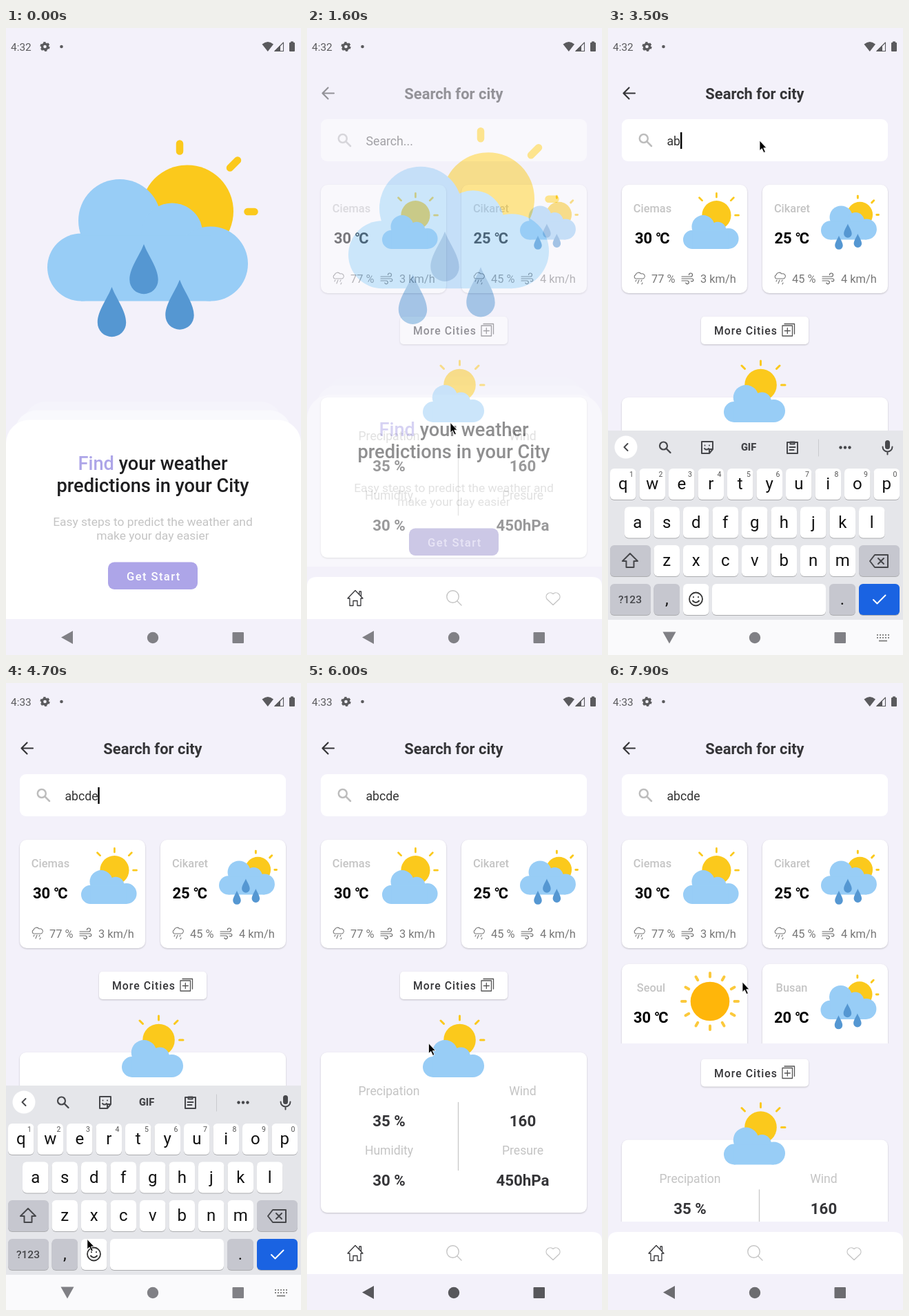
An HTML page that plays this animation: 428x908 px, repeating every 8000 ms.

```html
<!DOCTYPE html>
<html lang="en">
<head>
<meta charset="utf-8">
<title>Weather app</title>
<style>
  html, body { margin: 0; height: 100%; overflow: hidden; background: #f3f1fa; }
  svg { display: block; width: 100vw; height: 100vh; font-family: Roboto, "Noto Sans CJK JP", sans-serif; }
  .card { fill: #fff; filter: drop-shadow(0 1px 1px rgba(0,0,0,.2)); }
  .key { filter: drop-shadow(0 1px 0 rgba(0,0,0,.25)); }
  .line { fill: none; stroke-linecap: round; stroke-linejoin: round; }
</style>
</head>
<body>
<svg id="stage" viewBox="0 0 428 908"></svg>
<script>
const BG = '#f3f1fa', DARK = '#353538', PALE = '#c4c4c4', SUN = '#fbc91c', CLOUD = '#98cdf6';

const text = (x, y, s, size, fill, more = '') =>
  `<text x="${x}" y="${y}" font-size="${size}" fill="${fill}" ${more}>${s}</text>`;
const MID = 'text-anchor="middle"', MEDIUM = 'font-weight="500"', BOLD = 'font-weight="700"';
const rect = (x, y, w, h, r, fill, more = '') =>
  `<rect x="${x}" y="${y}" width="${w}" height="${h}" rx="${r}" fill="${fill}" ${more}/>`;
const circle = (x, y, r, fill, more = '') => `<circle cx="${x}" cy="${y}" r="${r}" fill="${fill}" ${more}/>`;
const line = (d, stroke, width, more = '') =>
  `<path class="line" d="${d}" stroke="${stroke}" stroke-width="${width}" ${more}/>`;
const at = (x, y, s, body) => `<g transform="translate(${x} ${y}) scale(${s})">${body}</g>`;

// Weather pictures; the cloud's origin is its lower left corner
const cloud = `<g fill="${CLOUD}"><circle cx="49" cy="-49" r="49"/><circle cx="105" cy="-116.5" r="60"/>
  <circle cx="181" cy="-97.5" r="44.5"/><circle cx="237" cy="-54" r="54"/><rect x="49" y="-95" width="188" height="95"/></g>`;
const drop = (x, y) => `<path transform="translate(${x} ${y})" fill="#5597d2"
  d="M0-51.5C6-35 20.7-17 20.7 0A20.7 20.7 0 0 1-20.7 0C-20.7-17-6-35 0-51.5z"/>`;
const rainy = circle(203, -130, 67, SUN) +
  line('M192-228v11M265-193l11-11M290.5-129.5h10', SUN, 10.5) +
  cloud + drop(140, -31) + drop(93.5, 31) + drop(192, 20.5);
const cloudy = circle(53.5, -54, 23.3, SUN) +
  line('M53.5-89v6M26-82l4.5 4.5M81-82l-4.5 4.5M83.5-54h5.5', SUN, 3) + at(0, 0, .306, cloud);
const sunny = circle(0, 0, 28.3, '#ffb60a') +
  Array.from({length: 12}, (_, i) => line('M0-35.5v-5.5', '#fbc93c', 4, `transform="rotate(${i * 30})"`)).join('');

const rainIcon = line('M3 9a3 3 0 0 1 0-5.500A4.500 4.500 0 0 1 11 2A3.600 3.600 0 0 1 14 9M4 9h10M4 11l-1 2M8 11l-2 5M12 11l-1 2M13 15l-1 2', '#777', 1.1);
const windIcon = line('M0 5h13a2.500 2.500 0 1 0-2.500-2.500M0 8h15a2 2 0 1 1-1.500 3.500M0 11h8a2.300 2.300 0 1 1-2.200 3', '#666', 1.2);

function cityCard(x, y, city, degrees, shift, humidity, wind, picture) {
  return `<rect class="card" x="${x}" y="${y}" width="182" height="157" rx="10"/>` +
    text(x + 44.5 + shift, y + 40, city, 16.4, PALE, MID + MEDIUM) +
    text(x + 19 + shift, y + 85, degrees + ' ℃', 22, '#000', BOLD) +
    at(x + 17, y + 127, 1, rainIcon) + text(x + 43, y + 142, humidity + ' %', 16.4, '#777') +
    at(x + 87, y + 128, 1, windIcon) + text(x + 114, y + 142, wind + ' km/h', 16.4, '#777') + picture;
}
const stat = (x, y, label, value) =>
  text(x, y, label, 17.6, PALE, MID) + text(x, y + 45, value, 22.3, DARK, MID + BOLD);

const welcome = `<g id="picture">${at(60, 395.5, 1, rainy)}</g>
  <g id="sheet">${rect(26, 541, 375, 200, 32, '#f5f4fb')}${rect(13, 553.5, 401, 200, 32, '#f9f9fd')}
  ${rect(0, 567.5, 428, 400, 34, '#fff')}</g>
  <g id="pitch">
  ${text(213, 640, `<tspan fill="#ada5e8">Find</tspan> your weather`, 27.2, '#1e1e20', MID + MEDIUM)}
  ${text(213, 672, 'predictions in your City', 27.2, '#1e1e20', MID + MEDIUM)}
  ${text(213, 720.5, 'Easy steps to predict the weather and', 17.4, PALE, MID)}
  ${text(213, 741, 'make your day easier', 17.4, PALE, MID)}
  ${rect(148, 773.5, 130, 39.5, 9, '#ada5e8', 'id="start"')}
  ${text(175, 800, 'Get Start', 16.6, '#fff', MEDIUM + ' letter-spacing="1.4" id="startText"')}</g>`;

const home = rect(0, 0, 428, 856, 0, BG) +
  line('M39 94.500H22.500M30.500 86.500l-8 8l8 8', DARK, 2.2) +
  text(213, 103, 'Search for city', 21.9, DARK, MID + BOLD) +
  rect(20, 132, 386, 61, 9, '#fff') +
  circle(51.8, 160, 6, 'none', 'stroke="#bdbdbd" stroke-width="2.5"') + line('M56.500 164.500l6.500 6.500', '#bdbdbd', 2.5) +
  text(85.5, 170, '', 17.7, '#555', 'id="query"') + rect(0, 151, 2.4, 24, 0, '#000', 'id="caret"') +
  cityCard(20, 227, 'Ciemas', 30, 0, 77, 3, at(109, 320, .905, cloudy)) +
  cityCard(224, 227, 'Cikaret', 25, -1.5, 45, 4, at(309, 306.5, .278, rainy)) +
  `<clipPath id="listEnd"><rect width="428" height="522"/></clipPath><g id="moreRow" clip-path="url(#listEnd)">` +
  cityCard(20, 407, 'Seoul', 30, -2, 60, 5, at(148, 461, 1, sunny)) +
  cityCard(224, 407, 'Busan', 20, -2, 50, 4, at(308.5, 487, .278, rainy)) + '</g><g id="lower">' +
  '<rect class="card" x="135" y="418" width="156" height="40" rx="5"/>' +
  text(154, 444, 'More Cities', 15.8, DARK, MEDIUM + ' letter-spacing="1"') +
  line('M253 431h14.500v15h-14.500zM256 428.500h14.500v14.500M260.300 434.500v8M256.300 438.500h8', '#555', 1.3) +
  '<rect class="card" x="20" y="535" width="386" height="232" rx="9"/>' + at(168, 571, 1, cloudy) +
  stat(119, 597, 'Precipation', '35 %') + stat(313, 597, 'Wind', 160) +
  stat(119, 683, 'Humidity', '30 %') + stat(313, 683, 'Presure', '450hPa') +
  line('M219.500 607.500v98', '#c8c8c8', 1.3) + '</g>';

const tabs = rect(0, 780, 428, 76, 0, BG) + '<path d="M0 856V809Q0 795 14 795H414Q428 795 428 809V856z" fill="#fff"/>' +
  line('M59 826l11-11.500l11 11.500h-3v10.500h-5v-7h-6v7h-5v-10.500zM76 820v-4h2.500v7', DARK, 1.3) +
  circle(211.5, 823.5, 8.7, 'none', `stroke="${PALE}" stroke-width="1.4"`) + line('M218 830l6 6', PALE, 1.4) +
  line('M357 835.500L348 827A5.900 5.900 0 0 1 357 819.500A5.900 5.900 0 0 1 366 827z', PALE, 1.3);

// Keyboard
const GREY = '#c6c7cf', INK = '#46474b';
const key = (x, y, w, label = '', fill = '#fff', size = 24) =>
  rect(x, y, w, 45, 6, fill, 'class="key"') + text(x + w / 2, y + 30, label, size, '#111', MID);
const keyRow = (x, y, letters) => [...letters].map((c, i) => key(x + 42.5 * i, y, 37.5, c)).join('');
const keyboard = rect(0, 583, 428, 330, 0, '#e5e6ea') +
  circle(26, 607, 16.5, '#fff') + line('M28.500 602l-5 5l5 5', INK, 2, 'id="chevron"') +
  '<g id="tools">' + circle(80.5, 605, 5.5, 'none', `stroke="${INK}" stroke-width="2.2"`) + line('M85 609.500l5.500 5.500', INK, 2.4) +
  line('M136 599h16v11l-5 6h-11zM147 616v-6h5M140 609q3 3 6 0M140.500 604.500v.1M147 604.500v.1', INK, 2) +
  text(204, 612, 'GIF', 14.5, INK, MID + 'font-weight="900"') +
  line('M260 600h15v16h-15zM264.500 599.500h6v3h-6zM263.500 607h8M263.500 611h6', INK, 2) +
  line('M305.500 596v24', '#c9cacf', 1) + [337.5, 344, 350.5].map(x => circle(x, 607.5, 2.2, INK)).join('') + '</g>' +
  rect(402, 597, 7, 13, 3.5, INK) + line('M398.500 606.500a7 7 0 0 0 14 0M405.500 613.500v4', INK, 2) +
  keyRow(3, 638, 'qwertyuiop') +
  [...'1234567890'].map((c, i) => text(34 + 42.5 * i, 650, c, 10.5, '#555', MID)).join('') +
  keyRow(24, 693.5, 'asdfghjkl') +
  key(3, 749, 59, '', GREY) + keyRow(66.5, 749, 'zxcvbnm') + key(364, 749, 59, '', GREY) +
  line('M32 761l-11 11h5.500v9h11v-9h5.500z', INK, 2) +
  line('M387 763h19v18h-19l-7-9zM392 768l8 8M400 768l-8 8', INK, 2) +
  key(3, 805, 59, '', GREY) + text(32, 833, '?123', 15.5, INK, MID + MEDIUM) +
  key(66.5, 805, 37.5, ',', GREY) + key(109, 805, 37.5) + key(151, 805, 165) +
  key(321, 805, 38, '.', GREY) + key(364, 805, 59, '', '#1a63e2') +
  circle(127.5, 827, 9.5, 'none', 'stroke="#333" stroke-width="1.8"') +
  line('M123 829.500q4.500 5 9 0M124 824v.3M131 824v.3', '#333', 2) + line('M385 828l5.500 5.500l12-12', '#fff', 2);

const keyDots = Array.from({length: 10}, (_, i) =>
  rect(390 + i % 5 * 4, 878 + Math.floor(i / 5) * 4, 2, 2, 0, '#888')).join('') + rect(393, 886.5, 12, 2, 0, '#888');
const systemIcons = `<path id="back" d="M-9 0L8-9.500V9.500z"/><circle cx="213" cy="883" r="8.200"/>` +
  '<rect x="328.500" y="875" width="16.500" height="16" rx="1"/>';

const status = '<g fill="#5a5a5d">' + text(7, 33, '', 15.4, '#5a5a5d', 'id="clock"') +
  circle(56.5, 27, 4, 'none', 'stroke="#5a5a5d" stroke-width="3.4"') +
  circle(56.5, 27, 5.8, 'none', 'stroke="#5a5a5d" stroke-width="2.6" stroke-dasharray="3.200 2.874"') +
  circle(80.5, 27, 2.3, '#5a5a5d') +
  '<path d="M371.500 23.500Q380 16.500 388 23.500L379.800 34z"/><path d="M389 34L398 25V34z"/>' +
  line('M390 33.500h12.500v-12.500z', '#5a5a5d', 1.1) + rect(411, 21, 8, 13, 1, '#5a5a5d') + rect(413, 19.5, 4, 3, 0, '#5a5a5d') + '</g>';

document.getElementById('stage').innerHTML = rect(0, 0, 428, 908, 0, BG) +
  `<g id="welcome">${welcome}</g><g id="home">${home}</g><g id="tabs">${tabs}</g>` +
  rect(0, 856, 428, 52, 0, BG, 'id="systemBar"') + `<g id="keyboard">${keyboard}</g>` +
  rect(0, 857, 428, 51, 0, '#fafafc', 'id="keyboardBar"') +
  rect(33, 856, 111, 52, 26, '#000', 'id="ripple" opacity=".1"') +
  `<g id="system">${systemIcons}</g><g id="keyDots">${keyDots}</g>${status}` +
  `<path id="pointer" d="M0 0V14.500L3.300 11.600L6 17.500L8.400 16.400L5.700 10.700H10z" stroke="#fff" stroke-width=".8"/>`;

const el = {};
document.querySelectorAll('[id]').forEach(e => el[e.id] = e);
const set = (id, name, value) => el[id].setAttribute(name, value);
const show = (id, on) => set(id, 'display', on ? 'inline' : 'none');
const moveY = (id, y) => set(id, 'transform', `translate(0 ${y})`);
const ramp = (t, a, b) => Math.min(1, Math.max(0, (t - a) / (b - a)));

// time, x, y
const path = [[100, 354, 165], [800, 180, 790], [1400, 180, 790], [1800, 236, 353], [1900, 236, 353],
  [2400, 220, 163], [4300, 220, 163], [4800, 106, 880], [5000, 106, 880], [5100, 113, 840],
  [5700, 168, 563], [6500, 195, 433], [8000, 195, 433]];
function pointerAt(t) {
  const i = Math.max(1, path.findIndex(p => p[0] >= t));
  const [a, b] = [path[i - 1], path[i]], k = ramp(t, a[0], b[0]), s = k * k * (3 - 2 * k);
  return [a[1] + (b[1] - a[1]) * s, a[2] + (b[2] - a[2]) * s];
}
const typedAt = [3300, 3400, 4100, 4300, 4500];
const caretX = [85.5, 95, 105, 114, 124, 133.3];

function draw(t) {
  const pressed = t >= 1400;
  moveY('picture', pressed ? -18.3 : 0);
  moveY('sheet', pressed ? -36.3 : 0);
  moveY('pitch', pressed ? -49 : 0);
  set('start', 'fill', pressed ? '#9a91cd' : '#ada5e8');
  set('startText', 'fill', pressed ? '#d0caec' : '#fff');
  show('tabs', pressed);
  show('home', t > 1400);
  set('home', 'opacity', ramp(t, 1400, 1800));

  const count = typedAt.filter(k => t >= k).length;
  el.query.textContent = count ? 'abcde'.slice(0, count) : 'Search...';
  set('query', 'fill', count ? '#333' : '#555');
  set('caret', 'x', caretX[count]);
  show('caret', t >= 2600 && (t < 5100 || Math.floor((t - 5100) / 500) % 2 === 0));

  const expanded = t >= 7600;
  show('moreRow', expanded);
  moveY('lower', expanded ? 126.5 : 0);

  const closing = ramp(t, 4900, 5300), up = ramp(t, 2800, 3200) * (1 - closing);
  show('keyboard', up > 0);
  moveY('keyboard', 273 * (1 - up));
  set('keyboard', 'opacity', Math.max(0, 1 - (1 - up) * 1.2));
  show('tools', t < 4900);
  set('chevron', 'transform', t < 4900 ? '' : 'rotate(180 26 607)');
  show('keyboardBar', up === 1);
  show('keyDots', t >= 2700 && t < 4900);
  show('ripple', t >= 4900 && t < 5400);
  set('back', 'transform', `translate(89 882.5) rotate(${-90 * up})`);
  set('system', 'fill', t < 4900 ? '#808085' : expanded ? '#6c6c70' : '#57575b');

  el.clock.textContent = t < 3700 ? '4:32' : '4:33';
  show('pointer', t >= 100);
  set('pointer', 'transform', `translate(${pointerAt(t)})`);
}

function tick() {
  draw(Math.floor(performance.now() % 8000 / 100) * 100);
  requestAnimationFrame(tick);
}
tick();
</script>
</body>
</html>
```
